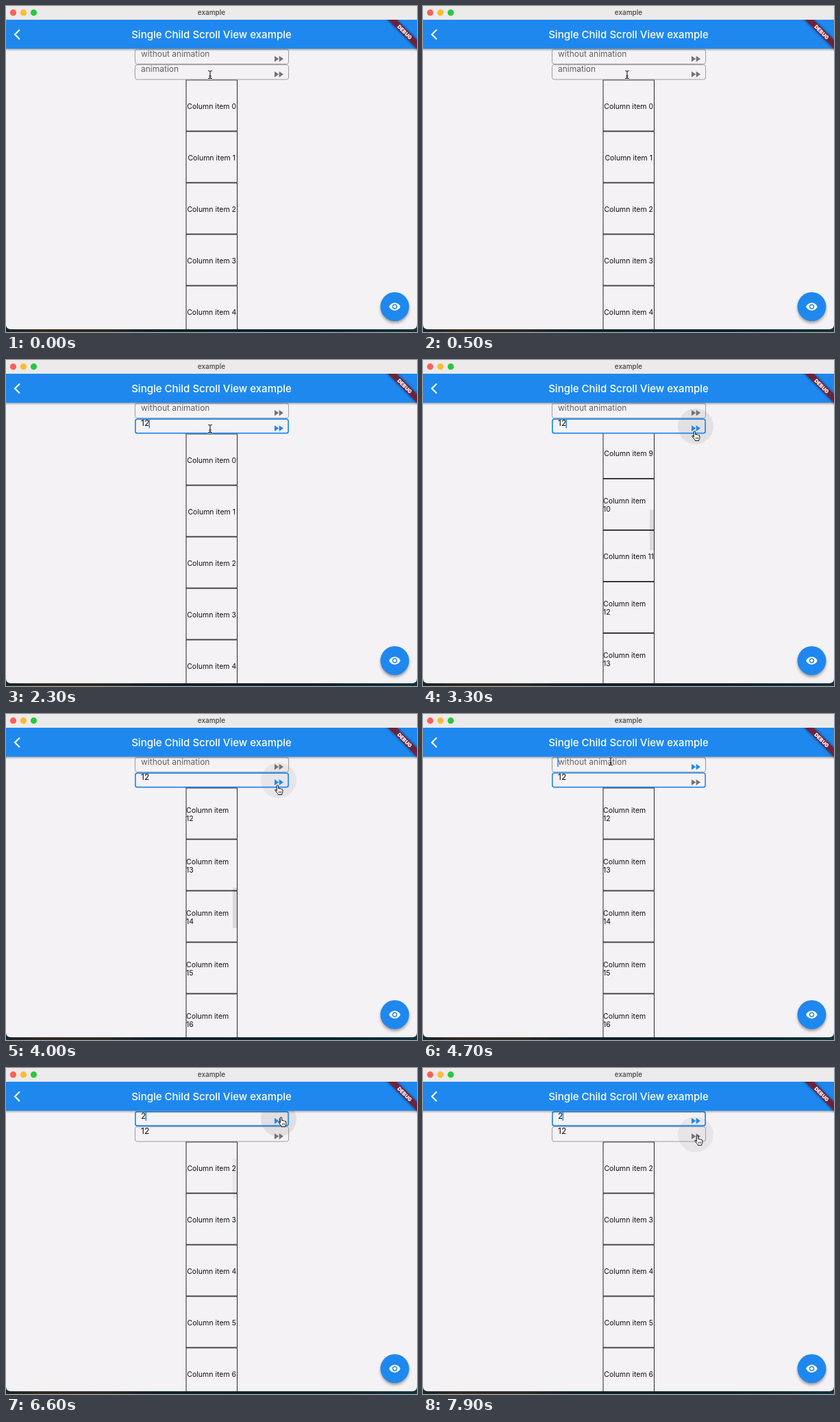
An HTML page for the animation above (8 s loop, 600 by 475 pixels).

```html
<!DOCTYPE html>
<html lang="en">
<head>
<meta charset="utf-8">
<title>Scroll view example</title>
<style>
html, body { margin: 0; width: 100%; height: 100%; overflow: hidden; background: #10212b; }
svg { display: block; width: 600px; height: 475px; font-family: Inter, Roboto, sans-serif; }
text { white-space: pre; }
.mid { text-anchor: middle; }
.item { font-size: 10.5px; fill: #111; }
.field { font-size: 12px; }
</style>
</head>
<body>
<svg viewBox="0 0 600 475">
  <defs>
    <linearGradient id="desk">
      <stop offset="0" stop-color="#14262d"/><stop offset=".08" stop-color="#33281f"/>
      <stop offset=".25" stop-color="#2b2a24"/><stop offset=".36" stop-color="#10222d"/>
      <stop offset=".75" stop-color="#0d222e"/><stop offset="1" stop-color="#12323c"/>
    </linearGradient>
    <linearGradient id="shade" x2="0" y2="1">
      <stop offset="0" stop-color="#000" stop-opacity=".3"/><stop offset="1" stop-color="#000" stop-opacity="0"/>
    </linearGradient>
    <filter id="blur" x="-50%" y="-50%" width="200%" height="200%"><feGaussianBlur stdDeviation="2.3"/></filter>
    <clipPath id="body"><rect y="62" width="600" height="409"/></clipPath>
    <clipPath id="view"><rect x="250" y="107" width="100" height="364"/></clipPath>
    <clipPath id="bar"><rect y="20" width="600" height="60"/></clipPath>
    <path id="skip" d="M-6-4.3L.2 0L-6 4.3ZM.7-4.3L7 0L.7 4.3Z"/>
  </defs>

  <rect width="600" height="475" fill="url(#desk)"/>
  <path d="M0 0H600V464Q600 471 593 471H7Q0 471 0 464Z" fill="#f4f2f5"/>

  <g clip-path="url(#body)"><circle id="halo" r="26"/></g>
  <g clip-path="url(#view)">
    <g id="list"></g>
    <rect id="thumb" x="331" width="6" fill="#000"/>
  </g>
  <g id="fields" clip-path="url(#body)"></g>

  <rect y="62" width="600" height="4" fill="url(#shade)"/>
  <rect width="600" height="20.5" fill="#eceaea"/>
  <rect y="20" width="600" height="42.3" fill="#1f88ef"/>
  <circle cx="10.5" cy="9.7" r="4.6" fill="#fe5f57"/>
  <circle cx="25.5" cy="9.7" r="4.6" fill="#febc2e"/>
  <circle cx="40.5" cy="9.7" r="4.6" fill="#28c840"/>
  <text class="mid" x="300" y="13.2" font-size="10" font-weight="500" fill="#444">example</text>
  <path d="M20 34.6L13 41.5L20 48.4" fill="none" stroke="#fff" stroke-width="2.1"/>
  <text class="mid" x="300" y="46.8" font-size="15" font-weight="500" fill="#fff">Single Child Scroll View example</text>

  <g clip-path="url(#bar)"><g transform="translate(600 20) rotate(45)">
    <rect x="-34" y="21" width="68" height="9" fill="#000" opacity=".55" filter="url(#blur)"/>
    <rect x="-34" y="21" width="68" height="9" fill="#7a1e35" opacity=".88"/>
    <text class="mid" y="28.3" font-size="7.6" font-weight="900" fill="#fff">DEBUG</text>
  </g></g>

  <circle cx="567.5" cy="441" r="20.5" fill="#000" opacity=".4" filter="url(#blur)"/>
  <circle cx="567.5" cy="438" r="21" fill="#1f88ef"/>
  <path transform="translate(558.5 429) scale(.75)" fill="#fff" d="M12 4.5C7 4.5 2.73 7.61 1 12c1.73 4.39 6 7.5 11 7.5s9.27-3.11 11-7.5c-1.73-4.39-6-7.5-11-7.5zM12 17c-2.76 0-5-2.24-5-5s2.24-5 5-5 5 2.24 5 5-2.24 5-5 5zm0-8c-1.66 0-3 1.34-3 3s1.34 3 3 3 3-1.34 3-3-1.34-3-3-3z"/>

  <g id="beam" fill="none" stroke-linecap="round">
    <path d="M-2.5-5.5Q0-5.5 0-4V4Q0 5.5-2.5 5.5M2.5-5.5Q0-5.5 0-4M0 4Q0 5.5 2.5 5.5M-1.5 2H1.5" stroke="#fff" stroke-width="2.4" opacity=".7"/>
    <path d="M-2.5-5.5Q0-5.5 0-4V4Q0 5.5-2.5 5.5M2.5-5.5Q0-5.5 0-4M0 4Q0 5.5 2.5 5.5M-1.5 2H1.5" stroke="#111" stroke-width="1.1"/>
  </g>
  <g id="hand" stroke="#111" stroke-width="1" stroke-linejoin="round">
    <path fill="#fff" d="M-1.2 8.2V1Q-1.2-.4 0-.4T1.2 1V4.6Q2.7 3.8 3.4 5Q4.8 4.3 5.5 5.7Q7.4 5.2 7.4 7V9.4Q7.4 11 6.3 12.2V13.6H.7V12.4Q-1.5 10.5-3.6 7.4Q-4 6-2.6 6.2Z"/>
    <path fill="none" stroke-width=".7" d="M2 8.5V11M3.6 8.5V11M5.2 8.5V11"/>
  </g>
  <path id="arrow" d="M0 0V12.5L2.9 9.8L4.8 14L6.7 13.2L4.9 9.1H8.8Z" fill="#111" stroke="#fff" stroke-width=".8"/>
</svg>
<script>
const LOOP = 8000, ROW = 75, TOP = 107.5, COUNT = 30, VIEW = 364;
const BLUE = [31, 136, 239], GREY = [148, 146, 148];
const SCROLL_AT = 2840, SCROLL_MS = 1000, JUMP_AT = 6500;

// time, x, y of the pointer's rest points
const POINTER = [
  [0, 298, 100], [2350, 298, 100], [2720, 396.5, 104], [4050, 396.5, 104],
  [4480, 274, 69], [5750, 274, 69], [6250, 401.5, 72], [7050, 401.5, 72], [7500, 400.5, 99]
];

const $ = id => document.getElementById(id);
const clamp = v => Math.max(0, Math.min(1, v));
const smooth = v => v * v * (3 - 2 * v);

function add(parent, tag, attrs, label) {
  const node = document.createElementNS('http://www.w3.org/2000/svg', tag);
  for (const key in attrs) node.setAttribute(key, attrs[key]);
  if (label !== undefined) node.textContent = label;
  parent.append(node);
  return node;
}

function set(node, attrs) {
  for (const key in attrs) node.setAttribute(key, attrs[key]);
}

// CSS "ease" curve, solved by bisection
function ease(x) {
  const bez = (a, b, u) => 3 * a * u * (1 - u) ** 2 + 3 * b * u * u * (1 - u) + u ** 3;
  let lo = 0, hi = 1;
  for (let i = 0; i < 24; i++) {
    const mid = (lo + hi) / 2;
    if (bez(.25, .25, mid) < x) lo = mid; else hi = mid;
  }
  return bez(.1, 1, lo);
}

for (let i = 0; i < COUNT; i++) {
  const y = TOP + i * ROW;
  add($('list'), 'rect', { x: 263, y: y + .4, width: 74.5, height: ROW - .8, fill: 'none', stroke: '#111', 'stroke-width': .9 });
  if (i < 10 || i === 11) {
    add($('list'), 'text', { class: 'item mid', x: 300.2, y: y + 42 }, 'Column item ' + i);
  } else {
    add($('list'), 'text', { class: 'item', x: 263, y: y + 36 }, 'Column item');
    add($('list'), 'text', { class: 'item', x: 263, y: y + 48 }, i);
  }
}

function makeField(y, hint) {
  const root = $('fields');
  return {
    y, hint,
    box: add(root, 'rect', { rx: 3, fill: 'none' }),
    text: add(root, 'text', { class: 'field', x: 197, y: y + 11 }),
    caret: add(root, 'rect', { y: y + .8, width: 1.5, height: 13.5, fill: '#1f88ef' }),
    icon: add(root, 'use', { href: '#skip', transform: `translate(398 ${y + 14.6})` })
  };
}
const plain = makeField(62.5, 'without animation');
const moving = makeField(85, 'animation');

function drawField(f, value, focus, active, caretOn) {
  const w = .9 + .8 * focus;
  const rgb = GREY.map((c, i) => c + (BLUE[i] - c) * focus);
  set(f.box, {
    x: 188 + w / 2, y: f.y + w / 2 + .2, width: 225 - w, height: 22.3 - w,
    stroke: `rgb(${rgb})`, 'stroke-width': w
  });
  f.text.textContent = value || f.hint;
  set(f.text, { fill: value ? '#111' : '#626163' });
  set(f.icon, { fill: active ? '#1f88ef' : '#757375' });
  set(f.caret, {
    x: 196.3 + (value ? f.text.getComputedTextLength() : 0),
    opacity: active && caretOn ? 1 : 0
  });
}

const blink = (t, since) => (t - since) % 1000 < 500;

function pointerAt(t) {
  let i = 0;
  while (i < POINTER.length - 1 && POINTER[i + 1][0] <= t) i++;
  const a = POINTER[i], b = POINTER[i + 1] || a;
  const p = a === b ? 0 : smooth((t - a[0]) / (b[0] - a[0]));
  return [a[1] + (b[1] - a[1]) * p, a[2] + (b[2] - a[2]) * p];
}

function drawPointer(t) {
  const [x, y] = pointerAt(t);
  const inside = y > 62 && y < 110;
  const kind = inside && x > 374 && x < 422 ? 'hand' : inside && x > 188 && x < 413 ? 'beam' : 'arrow';
  for (const id of ['hand', 'beam', 'arrow']) {
    set($(id), { transform: `translate(${x} ${y})`, display: id === kind ? 'inline' : 'none' });
  }
  const splash = [SCROLL_AT, JUMP_AT].reduce((sum, at) =>
    sum + (t >= at ? 1 - clamp((t - at - 400) / 300) : 0), 0);
  set($('halo'), {
    cx: 398, cy: y < 85 ? 74 : 96.7,
    opacity: kind === 'hand' ? .055 + .025 * splash : 0
  });
}

function drawList(t) {
  const offset = t >= JUMP_AT ? 2 * ROW : 12 * ROW * ease(clamp((t - SCROLL_AT) / SCROLL_MS));
  const fade = (from, to) => Math.min(clamp((t - from) / 300), 1 - clamp((t - to - 600) / 300));
  const shown = Math.max(fade(SCROLL_AT, SCROLL_AT + SCROLL_MS), fade(JUMP_AT - 40, JUMP_AT));
  set($('list'), { transform: `translate(0 ${-offset})` });
  set($('thumb'), {
    y: TOP + offset * VIEW / (COUNT * ROW), height: VIEW * VIEW / (COUNT * ROW),
    opacity: .1 * shown
  });
}

function draw(t) {
  const focusMoving = clamp((t - 600) / 170), focusPlain = clamp((t - 4690) / 170);
  const inPlain = t >= 4690, inMoving = t >= 600 && !inPlain;
  drawField(plain, t >= 5500 ? '2' : '', focusPlain, inPlain, blink(t, t >= 5500 ? 5500 : 4690));
  drawField(moving, t >= 1200 ? '12' : t >= 1000 ? '1' : '',
    focusMoving * (1 - focusPlain), inMoving, blink(t, t >= 1200 ? 1200 : t >= 1000 ? 1000 : 600));
  drawList(t);
  drawPointer(t);
}

const start = performance.now();
function tick() {
  draw((performance.now() - start) % LOOP);
  requestAnimationFrame(tick);
}
tick();
</script>
</body>
</html>
```
